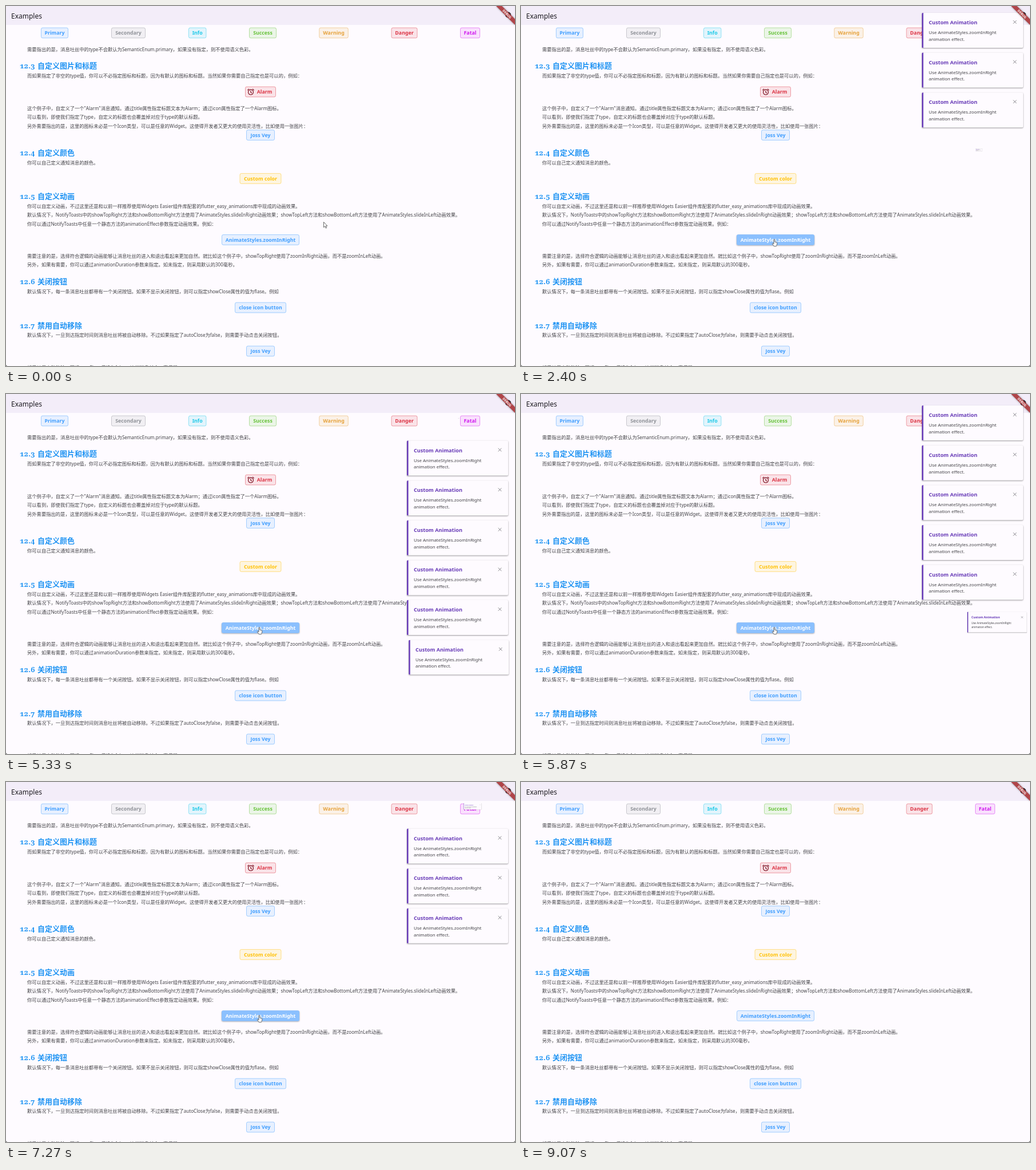
Write an HTML page that moves like this. It is 890 px wide and 629 px high and loops after 9800 ms.

```html
<!DOCTYPE html>
<html lang="zh-CN">
<head>
<meta charset="utf-8">
<title>Examples</title>
<style>
  html, body { margin: 0; width: 100%; height: 100%; overflow: hidden; background: #fefbff; }
  svg { display: block; width: 890px; height: 629px; }
  text { font: 8.3px "Noto Sans", "Noto Sans CJK SC", "Noto Sans CJK", sans-serif; fill: #444448; }
  .en { font-size: .97em; }
  .app { font-size: 12px; fill: #1d1b20; }
  .head { font-size: 13px; font-weight: 700; fill: #2094f3; }
  .num { font-family: "Noto Serif", serif; font-weight: 900; font-variant-numeric: oldstyle-nums; }
  .label { font-size: 8.8px; font-weight: 600; text-anchor: middle; fill: inherit; }
  .title { font-size: 9.1px; font-weight: 700; fill: #673ab7; }
  .note { font-size: 7.9px; }
  .debug { font-size: 5.6px; font-weight: 900; fill: #fff; text-anchor: middle; }
  .raised { filter: drop-shadow(0 1.2px 1.2px rgba(0, 0, 0, .4)); }
  .ribbon { fill: #b04549; filter: drop-shadow(0 0 1.7px rgba(0, 0, 0, .5)); }
</style>
</head>
<body>
<svg id="stage" viewBox="0 0 890 629"></svg>
<script>
const LOOP = 9800, FPS = 15;
const ZOOM = 300, SHIFT = 200;      // toast zoom and list shift durations
const PITCH = 69.6, CARD_W = 177, CARD_H = 61;
const BLUE = '#409eff', RED = '#dc3545';

// Toasts: [enter, leave]
const toasts = [[1124, 4124], [1330, 4310], [2036, 5036], [2380, 5390], [3165, 6168],
  [3315, 6315], [3810, 7020], [4534, 7534], [5037, 8037], [5690, 8690]];

// Pointer: [time, x, y]
const pointerPath = [[70, 555, 377], [670, 443, 408], [7730, 443, 408],
  [7930, 367, 440], [8000, 331, 450], [8530, 72, 629]];

// Buttons: label, colour, centre x, centre y, width
const buttons = [
  ['Primary', BLUE, 85, 47, 48], ['Secondary', '#909399', 214, 47, 60],
  ['Info', '#1cc9e8', 334.7, 47, 31.5], ['Success', '#67c23a', 449, 47, 48],
  ['Warning', '#e6a23c', 573, 47, 51.5], ['Danger', RED, 696.5, 47, 46],
  ['Fatal', '#d01aee', 811.5, 47, 35], ['Alarm', RED, 445, 150, 54],
  ['Joss Vey', BLUE, 445, 225.5, 50], ['Custom color', '#ffc107', 445, 301.5, 73],
  ['AnimateStyles.zoomInRight', BLUE, 445, 408.5, 136],
  ['close icon button', BLUE, 445, 527, 90], ['Joss Vey', BLUE, 445, 603, 50]
];

const headings = [['12.3', '自定义图片和标题', 104.5], ['12.4', '自定义颜色', 256.5],
  ['12.5', '自定义动画', 332.5], ['12.6', '关闭按钮', 481.5], ['12.7', '禁用自动移除', 558]];

const lines = [
  ['需要指出的是，消息吐丝中的type不会默认为SemanticEnum.primary，如果没有指定，则不使用语义色彩。', 75.5],
  ['而如果指定了非空的type值，你可以不必指定图标和标题，因为有默认的图标和标题。当然如果你需要自己指定也是可以的，例如：', 122],
  ['这个例子中，自定义了一个"Alarm"消息通知。通过title属性指定标题文本为Alarm；通过icon属性指定了一个Alarm图标。', 179],
  ['可以看到，即使我们指定了type，自定义的标题也会覆盖掉对应于type的默认标题。', 194],
  ['另外需要指出的是，这里的图标未必是一个Icon类型，可以是任意的Widget。这使得开发者又更大的使用灵活性，比如使用一张图片：', 209.5],
  ['你可以自己定义通知消息的颜色。', 273.5],
  ['你可以自定义动画，不过这里还是和以前一样推荐使用Widgets Easier组件库配套的flutter_easy_animations库中现成的动画效果。', 350],
  ['默认情况下，NotifyToasts中的showTopRight方法和showBottomRight方法使用了AnimateStyles.slideInRight动画效果；showTopLeft方法和showBottomLeft方法使用了AnimateStyles.slideInLeft动画效果。', 365],
  ['你可以通过NotifyToasts中任意一个静态方法的animationEffect参数指定动画效果。例如：', 380.5],
  ['需要注意的是，选择符合逻辑的动画能够让消息吐丝的进入和退出看起来更加自然。就比如这个例子中，showTopRight使用了zoomInRight动画，而不是zoomInLeft动画。', 437],
  ['另外，如果有需要，你可以通过animationDuration参数来指定。如未指定，则采用默认的300毫秒。', 452],
  ['默认情况下，每一条消息吐丝都带有一个关闭按钮。如果不显示关闭按钮，则可以指定showClose属性的值为flase。例如', 499],
  ['默认情况下，一旦到达指定时间则消息吐丝将被自动移除。不过如果指定了autoClose为false，则需要手动点击关闭按钮。', 575],
  ['如果禁用自动移除，可将autoClose值设为false，这样消息就会一直停留', 631.5]
];

const line = ([s, y]) => `<text x="37" y="${y + 3}">${
  s.replace(/[ -~]+/g, '<tspan class="en">$&</tspan>')}</text>`;

const heading = ([num, s, y]) => `<text class="head num" x="24" y="${y + 4.5}">${num}</text>
  <text class="head" x="55" y="${y + 4.7}">${s}</text>`;

const box = (cx, cy, w, attrs) =>
  `<rect x="${cx - w / 2 + .5}" y="${cy - 8.9}" width="${w - 1}" height="17.8" rx="2.5" ${attrs}/>`;

const label = (s, x, y) => `<text class="label" x="${x}" y="${y + 3.3}">${s}</text>`;

const alarmIcon = `<g fill="none" stroke="#7a0c1c" stroke-width="1.2">
  <circle cx="428" cy="150.6" r="4.4"/><path d="M428 148v3l2 1.3M422.4 147.2l2.6-2.3M433.6 147.2l-2.6-2.3"/></g>`;

const button = ([s, color, cx, cy, w]) => `<g fill="${color}">
  ${box(cx, cy, w, `fill-opacity=".12" stroke="${color}" stroke-opacity=".5" stroke-width=".9"`)}
  ${s === 'Alarm' ? alarmIcon + label(s, cx + 7, cy) : label(s, cx, cy)}</g>`;

const [hoverText, , hx, hy, hw] = buttons[10];

// Drawn around its own centre so that it can be zoomed
const toast = () => `<g class="toast" display="none">
  <g class="raised"><rect x="-89" y="-30.5" width="${CARD_W}" height="${CARD_H}" rx="2" fill="#fefbff"/>
  <path d="M-86.5-30.5h-1q-1.5 0-1.5 1.5v58q0 1.5 1.5 1.5h1z" fill="#673ab7"/></g>
  <text class="title" x="-77" y="-10.5">Custom Animation</text>
  <text class="note" x="-77" y="6.5">Use AnimateStyles.zoomInRight</text>
  <text class="note" x="-77" y="18.3">animation effect.</text>
  <path d="M70.7-17.3l5.6 5.6m0-5.6l-5.6 5.6" stroke="#77757c" stroke-width=".9"/></g>`;

const stage = document.getElementById('stage');
stage.innerHTML = `
  <rect width="890" height="629" fill="#fefbff"/>
  <rect width="890" height="33" fill="#f3edf9"/>
  <text class="app" x="9" y="21.7">Examples</text>
  <circle cx="878" cy="15.5" r="5" fill="#2b2028"/>
  ${lines.map(line).join('')}${headings.map(heading).join('')}
  <g id="lift" class="raised">${box(hx, hy, hw + 1, 'fill="#fefbff"')}</g>
  ${buttons.map(button).join('')}
  <g id="hover" fill="#fff">${box(hx, hy, hw + 1, 'fill="#8bc0fe"')}${label(hoverText, hx, hy)}</g>
  <path d="M0 626q0 3 3 3H0zM890 626q0 3-3 3h3z" fill="#444"/>
  ${toasts.map(toast).join('')}
  <path class="ribbon" d="M857 0h10L890 23v10z"/>
  <text class="debug" transform="translate(876 14) rotate(45)" y="2">DEBUG</text>
  <g id="pointer" fill="#fff" stroke="#444" stroke-width=".8" stroke-linejoin="round">
    <path id="arrow" d="M.5.5v9.3l2.1-2 1.6 3.4 1.5-.7-1.6-3.3h2.8z"/>
    <path id="hand" d="M-1 .2q1-1 1.9 0v4l3 .7q1.2.4 1 1.6l-.6 3.2-1 2H-.8l-2.7-4q0-1.2 1-1l1.5 1z"/>
  </g>`;

const [lift, hover, pointer, arrow, hand] =
  ['lift', 'hover', 'pointer', 'arrow', 'hand'].map(id => document.getElementById(id));
const cards = [...document.querySelectorAll('.toast')];
const ramp = (t, from, to) => Math.min(1, Math.max(0, (t - from) / (to - from)));

function drawToasts(t) {
  let y = 12;
  toasts.forEach(([enter, leave], i) => {
    const gone = leave + ZOOM;
    const scale = ramp(t, enter, enter + ZOOM) - ramp(t, leave, gone);
    const x = 790 + CARD_W * scale * (1 - scale);
    cards[i].setAttribute('display', scale > 0 ? 'inline' : 'none');
    cards[i].setAttribute('transform', `translate(${x} ${y + CARD_H / 2}) scale(${scale})`);
    y += PITCH * (1 - ramp(t, gone, gone + SHIFT));
  });
}

function drawPointer(t) {
  let [, x, y] = pointerPath[0];
  for (let i = 1; i < pointerPath.length; i++) {
    const [t0, x0, y0] = pointerPath[i - 1], [t1, x1, y1] = pointerPath[i];
    if (t < t0) break;
    const k = ramp(t, t0, t1);
    x = x0 + (x1 - x0) * k;
    y = y0 + (y1 - y0) * k;
  }
  const over = Math.abs(x - hx) < hw / 2 && Math.abs(y - hy) < 9.5;
  pointer.setAttribute('transform', `translate(${x} ${y})`);
  pointer.setAttribute('display', t < 8530 ? 'inline' : 'none');
  arrow.setAttribute('display', over ? 'none' : 'inline');
  hand.setAttribute('display', over ? 'inline' : 'none');
}

function draw(now) {
  const t = Math.floor((now % LOOP + 5) * FPS / 1000) * 1000 / FPS;
  drawToasts(t);
  drawPointer(t);
  hover.setAttribute('opacity', ramp(t, 480, 640) - ramp(t, 7800, 7930));
  lift.setAttribute('opacity', ramp(t, 480, 660) - ramp(t, 7930, 8060));
}

const start = performance.now();
function tick() {
  draw(performance.now() - start);
  requestAnimationFrame(tick);
}
tick();
</script>
</body>
</html>
```
